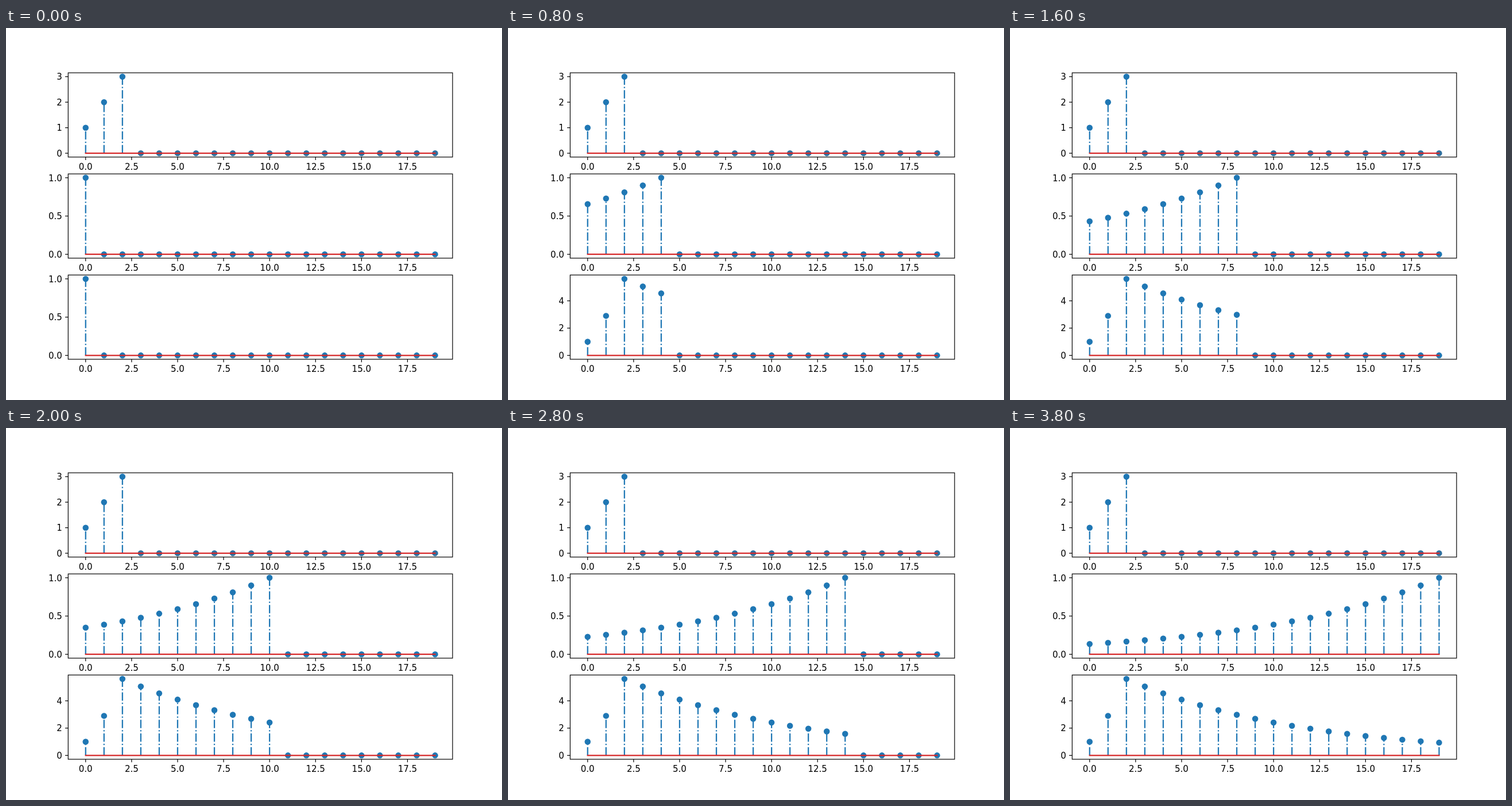
These frames come from a looping animation (864x648 px, 4000 ms). An HTML page with a canvas:

```html
<!DOCTYPE html>
<html>
<head>
<meta charset="utf-8">
<style>
html, body { margin: 0; width: 100%; height: 100%; overflow: hidden; background: #fff; }
canvas { display: block; }
</style>
</head>
<body>
<canvas id="stage" width="864" height="648"></canvas>
<script>
const ctx = document.getElementById("stage").getContext("2d");
const COUNT = 20, STEP_MS = 200, DECAY = 0.9;
const LEFT = 108, WIDTH = 669.6, TOP = 77.76, HEIGHT = 146.753, PITCH = 176.104;
const BLUE = "#1f77b4", RED = "#d62728", MUTED = "#30709f";
const DASH = [14.4, 3.6, 2.25, 3.6];

const indices = [...Array(COUNT).keys()];
const signal = indices.map(i => i < 3 ? i + 1 : 0);
const output = [];
signal.forEach((v, i) => output.push(v + DECAY * (output[i - 1] || 0)));

const xAt = i => LEFT + WIDTH * (i + 0.95) / 20.9;

function line(x1, y1, x2, y2, color, width, dash = []) {
  ctx.strokeStyle = color;
  ctx.lineWidth = width;
  ctx.setLineDash(dash);
  ctx.beginPath();
  ctx.moveTo(x1, y1);
  ctx.lineTo(x2, y2);
  ctx.stroke();
}

function label(text, x, y, align) {
  ctx.fillStyle = "#000";
  ctx.textAlign = align;
  ctx.fillText(text, x, y);
}

function drawPanel(row, values, zeroColor) {
  const top = TOP + row * PITCH, bottom = top + HEIGHT;
  const max = Math.max(...values);
  const yAt = v => bottom - HEIGHT * (v / max + 0.05) / 1.1;

  values.forEach((v, i) => {
    if (v) line(xAt(i), yAt(0), xAt(i), yAt(v), BLUE, 2.25, DASH);
  });
  values.forEach((v, i) => {
    ctx.fillStyle = v ? BLUE : zeroColor;
    ctx.beginPath();
    ctx.arc(xAt(i), yAt(v), 5.25, 0, 2 * Math.PI);
    ctx.fill();
  });
  line(xAt(0) - 1.1, yAt(0), xAt(COUNT - 1) + 1.1, yAt(0), RED, 2.25);

  for (let v = 0; v < 20; v += 2.5) {
    line(xAt(v), bottom, xAt(v), bottom + 5.25, "#000", 1.2);
    label(v.toFixed(1), xAt(v), bottom + 21.9, "center");
  }
  const step = [0.5, 1, 2].find(s => s >= max * 1.1 / 4);
  for (let v = 0; v <= max * 1.05; v += step) {
    line(LEFT - 5.25, yAt(v), LEFT, yAt(v), "#000", 1.2);
    label(v.toFixed(step < 1 ? 1 : 0), LEFT - 10.5, yAt(v) + 5.7, "right");
  }
  ctx.strokeRect(LEFT, top, WIDTH, HEIGHT);
}

function draw() {
  const n = Math.floor(performance.now() / STEP_MS) % COUNT;
  ctx.setTransform(1, 0, 0, 1, 0, 0);
  ctx.fillStyle = "#fff";
  ctx.fillRect(0, 0, 864, 648);
  ctx.translate(0.3, 0.3);
  ctx.font = '15px "DejaVu Sans", sans-serif';
  drawPanel(0, signal, MUTED);
  // The kernel slides right while the result fills in up to step n.
  drawPanel(1, indices.map(i => i <= n ? DECAY ** (n - i) : 0), BLUE);
  drawPanel(2, output.map((v, i) => i <= n ? v : 0), BLUE);
  requestAnimationFrame(draw);
}
draw();
</script>
</body>
</html>
```
